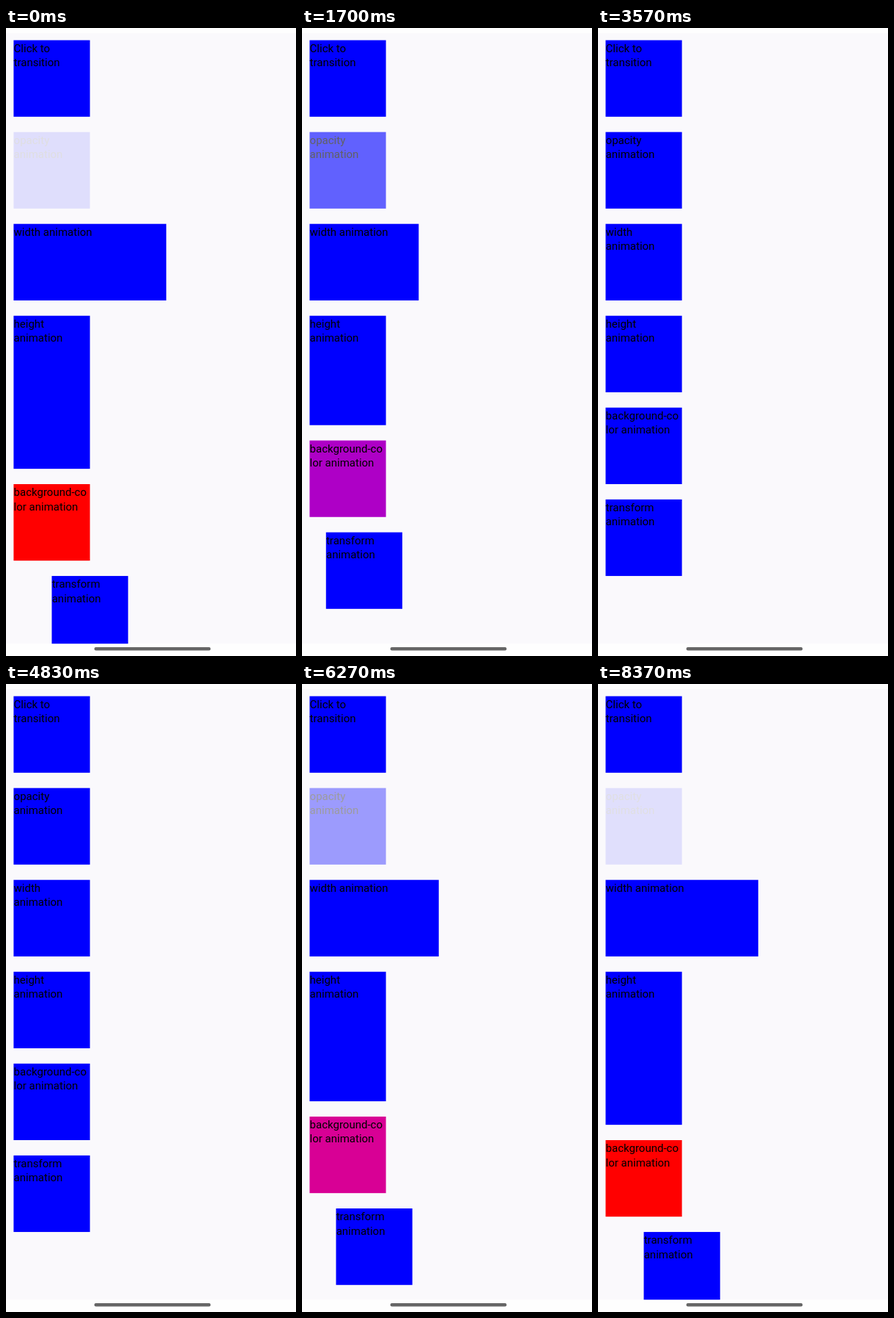
Recreate the animation shown at these times as an HTML page. Size 396 by 855 pixels, loop 8400 ms.

```html
<!DOCTYPE html>
<html lang="en">
<head>
<meta charset="utf-8">
<title>Transitions</title>
<style>
  html, body { margin: 0; width: 100%; height: 100%; overflow: hidden; background: #fefefe; }
  svg { position: absolute; left: 0; top: 0; }
  text { font: 15px Roboto, sans-serif; white-space: pre; }
</style>
</head>
<body>
<svg id="stage" width="396" height="855">
  <clipPath id="view"><rect y="7" width="396" height="831.3"/></clipPath>
  <rect y="7" width="396" height="831.3" fill="#faf9fc"/>
  <g id="page" clip-path="url(#view)"></g>
  <rect x="120.6" y="842.9" width="158.8" height="4.5" rx="2.2" fill="#666"/>
</svg>
<script>
const LOOP = 8400, DURATION = 2065, FALL = 523, RISE = 4841;
const SIZE = 104.2, STEP = 125.05, TOP = 16.6, LEFT = 10.4;
const page = document.getElementById("page");

function add(parent, tag, attrs) {
  const node = document.createElementNS("http://www.w3.org/2000/svg", tag);
  for (const key in attrs) node.setAttribute(key, attrs[key]);
  return parent.appendChild(node);
}

function makeBox(label, i) {
  const group = add(page, "g", {});
  const rect = add(group, "rect", { width: SIZE, height: SIZE, fill: "#00f" });
  const lines = label.split("\n").map((line, n) => {
    const text = add(group, "text", { x: .2, y: 16.4 + 19.1 * n });
    text.textContent = line;
    return text;
  });
  const place = (dx, dy) =>
    group.setAttribute("transform", `translate(${LEFT + dx} ${TOP + i * STEP + dy})`);
  place(0, 0);
  return { group, rect, lines, place };
}

const [, fade, wide, tall, tint, slide] = [
  "Click to\ntransition", "opacity\nanimation", "width\nanimation",
  "height\nanimation", "background-co\nlor animation", "transform\nanimation"
].map(makeBox);

const ramp = (t, start) => Math.min(1, Math.max(0, (t - start) / DURATION));
// Colours blend in linear light
const channel = v => Math.round(255 * v ** (1 / 2.2));

function draw(now) {
  const t = now % LOOP;
  const p = 1 - ramp(t, FALL) + ramp(t, RISE);
  const grow = SIZE * p;
  const wraps = SIZE + grow < 108;

  fade.group.setAttribute("opacity", 1 - .9 * p);
  wide.rect.setAttribute("width", SIZE + grow);
  wide.lines[0].textContent = wraps ? "width" : "width animation";
  wide.lines[1].textContent = wraps ? "animation" : "";
  tall.rect.setAttribute("height", SIZE + grow);
  tint.rect.setAttribute("fill", `rgb(${channel(p)},0,${channel(1 - p)})`);
  tint.place(0, grow);
  slide.place(grow / 2, grow);
}

const origin = performance.now();
function tick() {
  draw(performance.now() - origin);
  requestAnimationFrame(tick);
}
tick();
</script>
</body>
</html>
```
